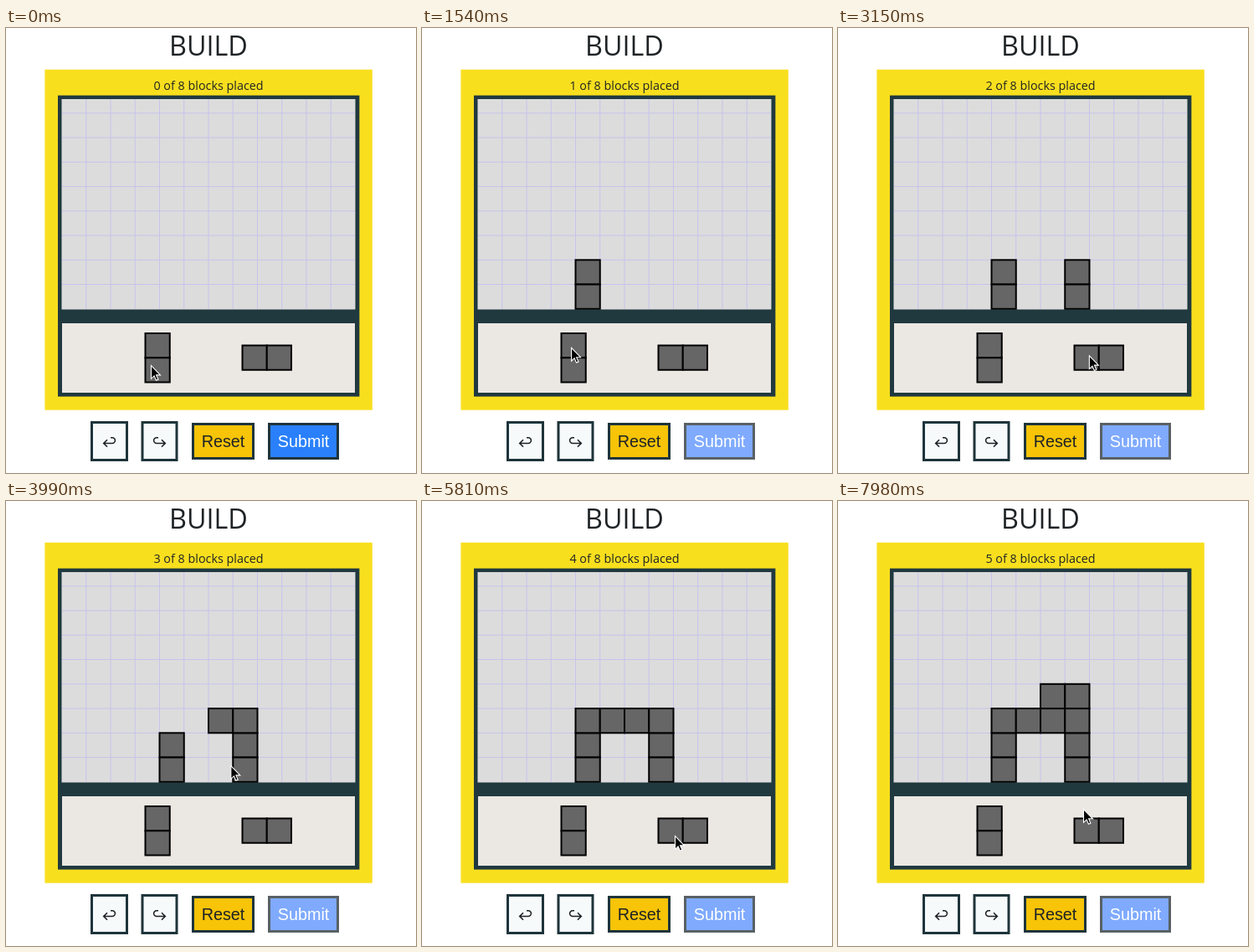
An HTML page that plays this animation: 490 by 532 pixels, repeating every 8000 ms.

```html
<!DOCTYPE html>
<html lang="en">
<head>
<meta charset="utf-8">
<title>Build</title>
<style>
  html, body { margin: 0; width: 100%; height: 100%; overflow: hidden; background: #fff; }
  svg { display: block; width: 490px; height: 532px; }
  text { text-anchor: middle; fill: #1f2326; font-family: "Open Sans", "Noto Sans", sans-serif; }
  .button { font: 19.8px "Liberation Sans", Arial, sans-serif; }
  .frame { stroke: #1f343b; stroke-width: 3; }
  .cell { fill: #666; stroke: #000; stroke-width: 2; }
  .ghost { fill: #c3c3c3; stroke: #a4a4cc; stroke-width: 2; }
  .arrow { fill: none; stroke: #1c2124; stroke-width: 1.6; }
  .off rect { fill: #7faafe; stroke: #596165; }
</style>
</head>
<body>
<svg viewBox="0 0 490 532">
  <text x="242" y="32.5" font-size="32.3">BUILD</text>
  <rect x="46.4" y="49.7" width="391.4" height="407" fill="#f8df1e"/>
  <text id="status" x="242" y="74.3" font-size="14.35"></text>
  <rect x="62" y="80.6" width="360.4" height="360" fill="#20393f"/>
  <rect x="66.5" y="85" width="351" height="251.5" fill="#dcdcdc"/>
  <path id="grid" stroke="#c6c3ec" fill="none"/>
  <rect x="67" y="353" width="350" height="83" fill="#ebe7e3"/>
  <g id="tray"></g>
  <g id="board"></g>

  <g class="frame">
    <rect x="102.5" y="471.5" width="42" height="45" fill="#f7fafb"/>
    <rect x="163" y="471.5" width="41" height="45" fill="#f7fafb"/>
    <rect x="223.5" y="473.5" width="72" height="41" fill="#f7c408"/>
  </g>
  <path class="arrow" d="M117 496.5h10a3.4 3.4 0 0 0 0-6.8h-2M121 492.3l-4.3 4.2 4.3 4.2"/>
  <path class="arrow" d="M190 496.5h-10a3.4 3.4 0 0 1 0-6.8h2M186 492.3l4.3 4.2-4.3 4.2"/>
  <text class="button" x="259.5" y="501">Reset</text>
  <g id="submit">
    <rect class="frame" x="314.5" y="473.5" width="82" height="41" fill="#2a80fb"/>
    <text class="button" x="355.5" y="501" style="fill:#fff">Submit</text>
  </g>
  <path id="cursor" d="M.5.5V16.3L4.1 12.9 6.5 18.3 8.9 17.3 6.6 11.9H11.5Z" fill="#000" stroke="#fff" stroke-width="1.1"/>
</svg>
<script>
const LOOP = 8000, STEP = 70;
const CELL = 29.25, LEFT = 66.5, FLOOR = 335.8;
const CARRY = 420, LINGER = 140, HOVER = 316;
const $ = id => document.getElementById(id);

// grip: where the pointer holds a piece, in cells; rest: its spot in the tray
const tall = { w: 1, h: 2, grip: 0.35, rest: [173, 403] };
const wide = { w: 2, h: 1, grip: 0.9, rest: [302, 400] };

// home: when the pointer is back in the tray
const moves = [
  { piece: tall, col: 4, lift: 560, drop: 1210, home: 1630 },
  { piece: tall, col: 7, lift: 1890, drop: 2730, home: 3220 },
  { piece: wide, col: 6, lift: 3220, drop: 3850, home: 4200 },
  { piece: wide, col: 4, lift: 4200, drop: 4760, home: 5810 },
  { piece: wide, col: 6, lift: 6230, drop: 6650, home: 7070 }
];

const progress = (t, from, to) => Math.min(1, Math.max(0, (t - from) / (to - from)));
const ease = k => k * k * (3 - 2 * k);
const mix = (a, b, k) => a.map((v, i) => v + (b[i] - v) * k);

// Carries each piece to its column, lingers, then returns to the tray
function pointer(t) {
  let at = tall.rest;
  moves.forEach(({ piece, col, lift, drop, home }, i) => {
    const over = [LEFT + (col + piece.grip) * CELL, HOVER];
    const next = (moves[i + 1]?.piece ?? wide).rest;
    at = mix(at, over, ease(progress(t, lift, lift + CARRY)));
    at = mix(at, next, ease(progress(t, drop + LINGER, home)));
  });
  // Idle sweep across the board and back
  const k = progress(t, moves.at(-1).home, LOOP - 20);
  const swing = Math.sin(Math.PI * k) ** 2;
  return [at[0] - 88 * swing - 9 * k, at[1] - 118 * swing - 32 * k];
}

const rect = (cls, x, y, w, h) =>
  `<rect class="${cls}" x="${x}" y="${y}" width="${w * CELL}" height="${h * CELL}"/>`;

function block(x, y, { w, h }) {
  let out = "";
  for (let i = 0; i < w; i++)
    for (let j = 0; j < h; j++) out += rect("cell", x + i * CELL, y + j * CELL, 1, 1);
  return out;
}

// Rests a piece on the stack below it
function land(heights, col, { w, h }) {
  const top = Math.max(...heights.slice(col, col + w)) + h;
  return { x: LEFT + col * CELL, y: FLOOR - top * CELL, top };
}

function draw(t) {
  const [px, py] = pointer(t);
  const heights = Array(12).fill(0);
  let placed = 0, out = "";
  for (const { piece, col, lift, drop } of moves) {
    if (t >= drop) {
      const { x, y, top } = land(heights, col, piece);
      heights.fill(top, col, col + piece.w);
      out += block(x, y, piece);
      placed++;
    } else if (t >= lift && py < FLOOR) {
      const { x, y } = land(heights, Math.floor((px - LEFT) / CELL), piece);
      out += rect("ghost", x, y, piece.w, piece.h);
    }
  }
  $("board").innerHTML = out;
  $("status").textContent = `${placed} of 8 blocks placed`;
  $("submit").setAttribute("class", placed ? "off" : "");
  $("cursor").setAttribute("transform", `translate(${px} ${py})`);
}

let lines = "";
for (let i = 1; i < 12; i++) lines += `M${LEFT + i * CELL} 85V336`;
for (let i = 1; i < 9; i++) lines += `M67 ${FLOOR - i * CELL}H417`;
$("grid").setAttribute("d", lines);
$("tray").innerHTML = block(166.5, 365, tall) + block(282.5, 379.5, wide);

let shown = -1;
function tick() {
  const t = Math.floor(performance.now() % LOOP / STEP) * STEP;
  if (t !== shown) draw(shown = t);
  requestAnimationFrame(tick);
}
tick();
</script>
</body>
</html>
```
